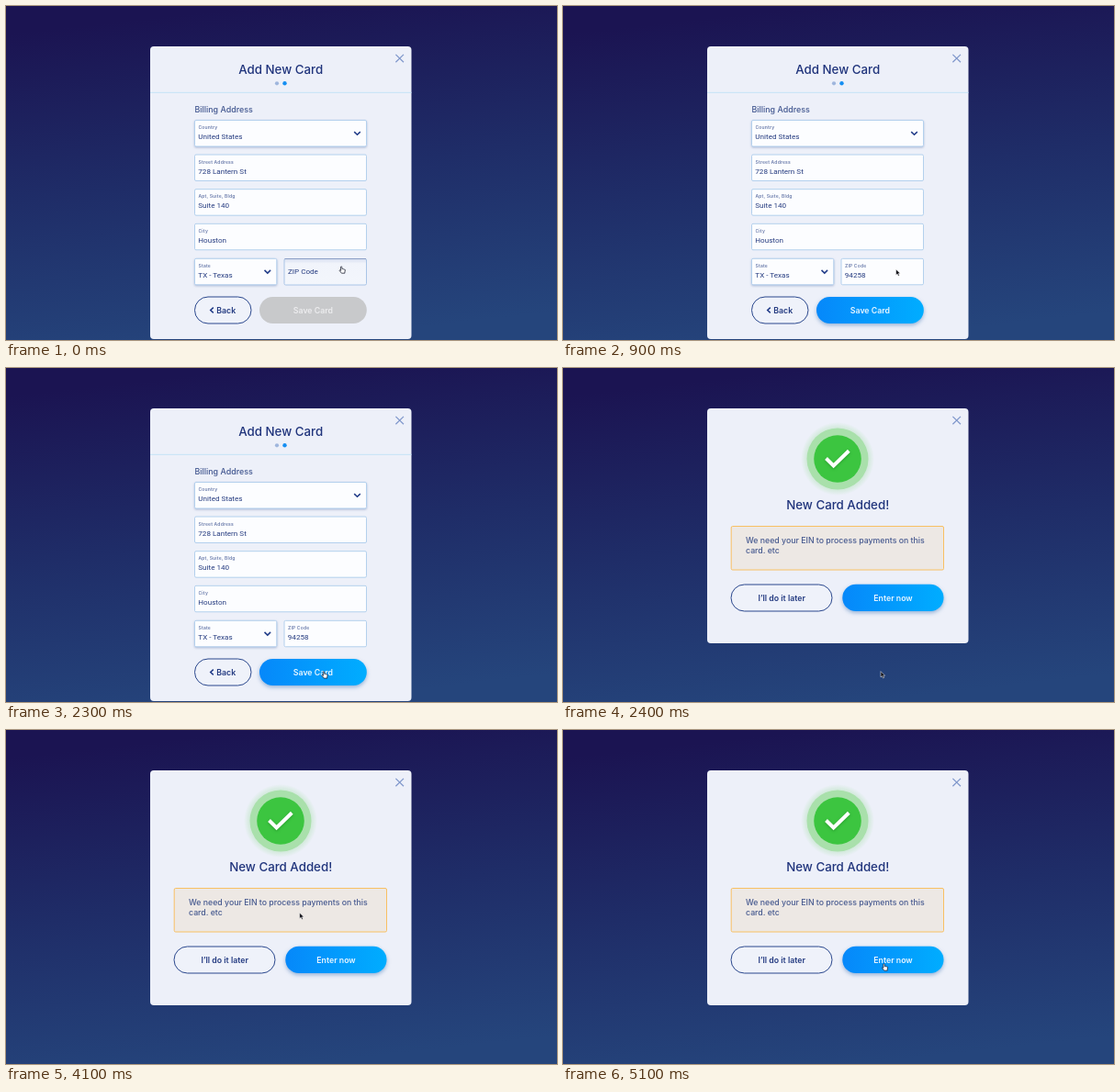
An HTML page that plays this animation: 600 px wide and 364 px high, repeating every 5.3 s.

```html
<!DOCTYPE html>
<html lang="en">
<head>
<meta charset="utf-8">
<title>Add New Card</title>
<style>
  html, body { margin: 0; width: 100%; height: 100%; overflow: hidden; background: #1b1553; }
  svg { display: block; width: 100vw; height: 100vh; }
  text { font-family: Inter, sans-serif; font-weight: 500; fill: #233a80; }
  .title { font-size: 13.3px; text-anchor: middle; fill: #20347c; }
  .section { font-size: 8.9px; fill: #41568f; }
  .label { font-size: 5px; font-weight: 600; letter-spacing: .18px; fill: #6c7dac; }
  .value { font: 400 8.1px Roboto, sans-serif; fill: #263c80; }
  .btn { font-size: 8.75px; font-weight: 600; text-anchor: middle; }
  .note { font-size: 8.76px; fill: #46598f; }
  .field { fill: #fcfdff; stroke: #b3d0ed; stroke-width: 1; }
  .raised { filter: drop-shadow(0 1px 1.2px #8193bd90); }
  .outline { fill: #eff2fa; stroke: #2a478d; stroke-width: 1; }
  .primary { fill: url(#blue); filter: drop-shadow(0 2px 2px #3d75b880); }
  .line { fill: none; stroke: #203b88; stroke-width: 1.5; }
</style>
</head>
<body>
<svg id="stage" viewBox="0 0 600 364" preserveAspectRatio="none">
  <defs>
    <linearGradient id="night" gradientUnits="userSpaceOnUse" x1="280" y1="0" x2="320" y2="364">
      <stop offset="0" stop-color="#1b1452"/>
      <stop offset=".5" stop-color="#1f2d68"/>
      <stop offset="1" stop-color="#25457c"/>
    </linearGradient>
    <linearGradient id="blue">
      <stop offset="0" stop-color="#0688fa"/>
      <stop offset="1" stop-color="#00adff"/>
    </linearGradient>
    <linearGradient id="inset" x2="0" y2="1">
      <stop offset="0" stop-color="#d5ddef"/>
      <stop offset=".18" stop-color="#f1f4fb"/>
      <stop offset="1" stop-color="#f3f6fc"/>
    </linearGradient>
    <radialGradient id="glow">
      <stop offset=".78" stop-color="#a5dfa8" stop-opacity=".5"/>
      <stop offset="1" stop-color="#a5dfa8" stop-opacity="0"/>
    </radialGradient>
  </defs>
  <rect width="600" height="364" fill="url(#night)"/>
  <rect id="panel" x="157" y="44" width="284.5" rx="4" fill="#edf0f9"/>

  <g id="form">
    <text class="title" x="299.2" y="74">Add New Card</text>
    <circle cx="295" cy="84.3" r="2.1" fill="#9fb6dd"/>
    <circle cx="303.5" cy="84.3" r="2.2" fill="#168ff2"/>
    <path d="M157 94.3H441.5" stroke="#c4e3f7"/>
    <text class="section" x="205.5" y="116">Billing Address</text>
    <g id="fields"></g>
    <g id="zipEmpty">
      <rect x="303" y="275.5" width="89.5" height="28.5" rx="1.5" fill="url(#inset)" stroke="#a9c4e6"/>
      <path d="M303.5 275.5H392" stroke="#8c9fc6"/>
      <text class="value" x="307" y="291.5">ZIP Code</text>
    </g>
    <g id="zipFull"></g>
    <rect class="outline" x="205.5" y="317" width="61.5" height="29" rx="14.5"/>
    <path class="line" d="M225.8 328.6L222.7 331.5L225.8 334.4"/>
    <text class="btn" x="239.7" y="334.6">Back</text>
    <rect id="save" x="276" y="317" width="116.8" height="29" rx="14.5"/>
    <text id="saveText" class="btn" x="334.4" y="334.6">Save Card</text>
  </g>

  <g id="done">
    <circle cx="299" cy="99" r="40" fill="url(#glow)"/>
    <circle cx="299" cy="99" r="33.5" fill="#a9e0ab"/>
    <circle cx="299" cy="99" r="25.8" fill="#3cc540"/>
    <path d="M286.5 98.5L294.6 106.4L311.3 90.3" fill="none" stroke="#fff" stroke-width="4"
      style="filter:drop-shadow(0 1.5px 1.5px #16801c90)"/>
    <text class="title" x="299.2" y="153.6">New Card Added!</text>
    <rect x="183.2" y="172.5" width="231.3" height="47.5" rx="1.5" fill="#ede8e4" stroke="#f8c063"/>
    <text class="note" x="199" y="190.8">We need your EIN to process payments on this</text>
    <text class="note" x="199" y="201.8">card. etc</text>
    <rect class="outline" x="183" y="236" width="110" height="29" rx="14.5"/>
    <text class="btn" x="238.2" y="253.6">I’ll do it later</text>
    <rect class="primary" x="304.3" y="235.7" width="110.2" height="29.3" rx="14.6"/>
    <text class="btn" x="359.5" y="253.6" style="fill:#e9f6ff">Enter now</text>
  </g>

  <path d="M424.4 52.9L433 61.3M433 52.9L424.4 61.3" stroke="#7f97cb" stroke-width="1.2"/>

  <g id="cursor">
    <path id="arrow" d="M0 0V6.3L1.5 5L2.5 7.3L3.7 6.8L2.7 4.6H4.6Z"
      fill="#0b0b12" stroke="#fff" stroke-width=".5"/>
    <path id="hand" d="M-.8 .6Q0 -.4 .6 .6L.9 3Q1.5 2.4 2.1 3.1Q2.8 2.7 3.2 3.4Q4.1 3.2 4.2 4.1
      L3.7 6.3V7.5H.2L-2.1 4.6Q-2 3.8 -1.2 4.1L-.5 4.7Z"
      fill="#fff" stroke="#15182a" stroke-width=".75" stroke-linejoin="round"/>
  </g>
</svg>
<script>
  const $ = id => document.getElementById(id);
  const LOOP = 5300, STEP = 100;
  const FILLED = 900, ADDED = 2400;

  function field(y, label, value, { x = 205.5, w = 187, select = false } = {}) {
    const cx = x + w - 10, cy = y + 14.2;
    const chevron = `<path class="line" d="M${cx - 3.3} ${cy - 1.6}l3.3 3.2l3.3 -3.2"/>`;
    return `<rect class="field${select ? " raised" : ""}" x="${x}" y="${y}" width="${w}" height="28.5" rx="1.5"/>
      <text class="label" x="${x + 4}" y="${y + 9.7}">${label}</text>
      <text class="value" x="${x + 3.8}" y="${y + 20.5}">${value}</text>${select ? chevron : ""}`;
  }

  $("fields").innerHTML =
    field(124.5, "Country", "United States", { select: true }) +
    field(162, "Street Address", "728 Lantern St") +
    field(199.7, "Apt, Suite, Bldg", "Suite 140") +
    field(237.3, "City", "Houston") +
    field(275.3, "State", "TX - Texas", { w: 89.3, select: true });
  $("zipFull").innerHTML = field(275.3, "ZIP Code", "94258", { x: 303, w: 89.5 });

  // time, x, y of the pointer's hot spot
  const route = [
    [0, 365.2, 283.7], [600, 362.8, 286.7], [900, 362.6, 286.9], [1300, 362.8, 289.5],
    [1400, 362.8, 289.5], [1900, 346, 330.5], [2900, 346, 330.8], [3600, 325, 206],
    [4100, 319.7, 199.2], [4300, 320, 201], [4900, 349, 253.5], [5100, 349.5, 254.7], [LOOP, 349.5, 254.7]
  ];

  function pointer(t) {
    const i = Math.max(1, route.findIndex(p => p[0] > t));
    const [t0, x0, y0] = route[i - 1], [t1, x1, y1] = route[i];
    const u = (t - t0) / (t1 - t0), k = u * u * (3 - 2 * u);
    return [x0 + (x1 - x0) * k, y0 + (y1 - y0) * k];
  }

  const show = (id, on) => $(id).setAttribute("display", on ? "inline" : "none");

  function draw(ms) {
    const t = Math.floor((ms % LOOP) / STEP) * STEP;
    const filled = t >= FILLED, added = t >= ADDED;
    const [x, y] = pointer(t);
    const onButton = added ? y > 236 && y < 265 : y > 317;
    const hand = !filled || onButton;

    $("panel").setAttribute("height", added ? 256 : 319);
    show("form", !added);
    show("done", added);
    show("zipEmpty", !filled);
    show("zipFull", filled);
    $("save").setAttribute("class", filled ? "primary" : "");
    $("save").setAttribute("fill", "#c8c9cb");
    $("saveText").style.fill = filled ? "#e9f6ff" : "#ececee";
    show("hand", hand);
    show("arrow", !hand);
    $("cursor").setAttribute("transform", `translate(${x} ${y})`);
  }

  const start = performance.now();
  function tick() {
    draw(performance.now() - start);
    requestAnimationFrame(tick);
  }
  tick();
</script>
</body>
</html>
```
